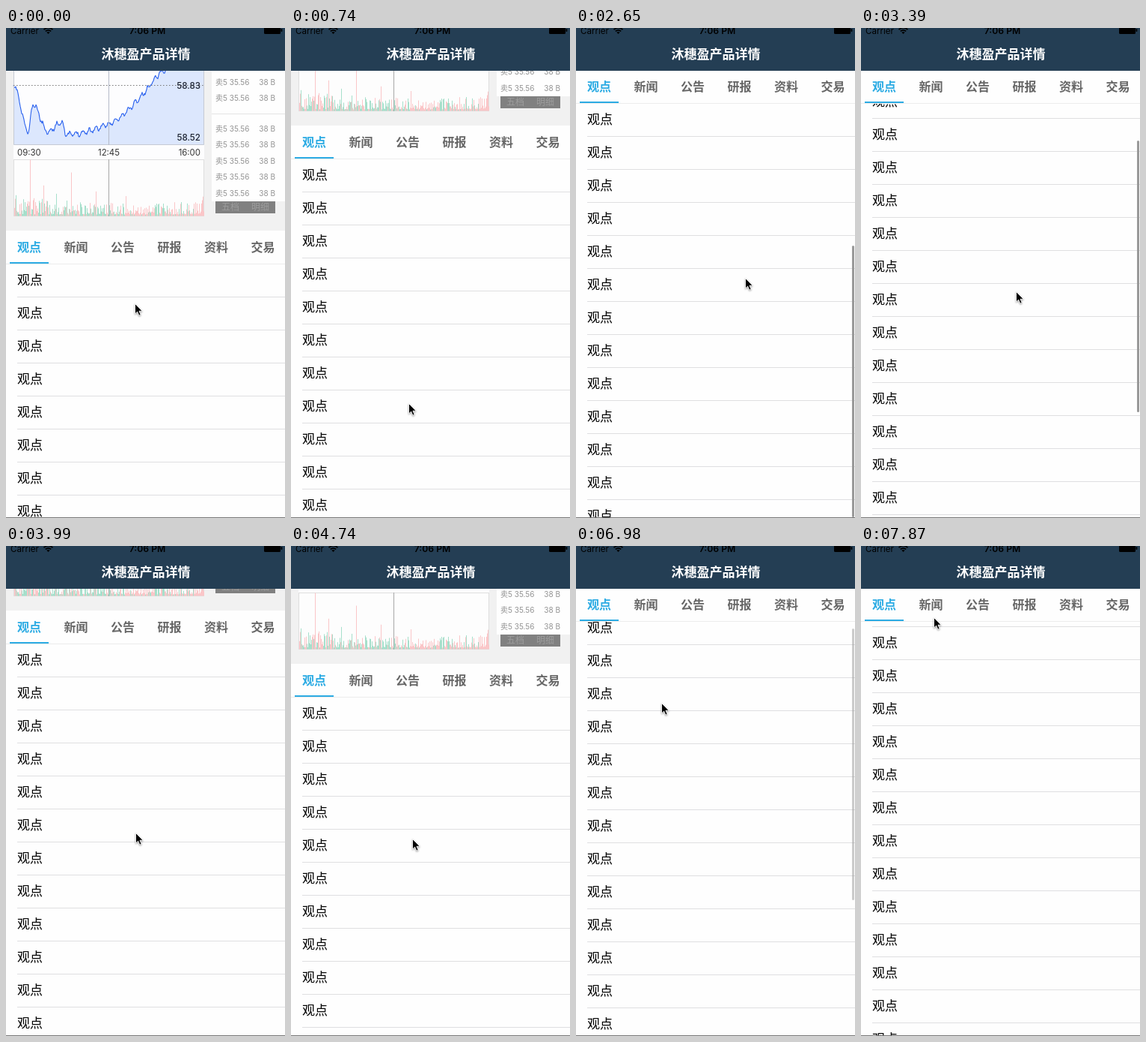
Write an HTML page that moves like this. It is 373 by 653 pixels and loops after 8 s.

```html
<!DOCTYPE html>
<html lang="zh-CN">
<head>
<meta charset="utf-8">
<title>产品详情</title>
<style>
html, body { margin: 0; width: 100%; height: 100%; overflow: hidden; background: #fefefe; }
body { position: relative; font-family: Inter, "Noto Sans CJK SC", "Noto Sans CJK", sans-serif; }
body > *, .abs { position: absolute; }
svg { display: block; overflow: hidden; }

#market { left: 0; top: 0; width: 373px; height: 270px; background: #f1f1f1; }
#market text { font-size: 11.6px; font-weight: 500; fill: #1c2230; }
#market .times text { font-size: 11.4px; font-weight: 400; fill: #333; }
#market .quotes text { font-size: 10px; font-weight: 400; fill: #949494; }
#market .modes text { font-size: 12px; font-weight: 400; fill: #9c9c9c; }

#list { left: 0; top: 44px; width: 373px; }
#list div { position: relative; height: 44px; padding-left: 15px; font-size: 17px; line-height: 45px; color: #000; }
#list div::after { content: ""; position: absolute; left: 15px; right: 0; top: 44px; height: 1px; background: #dfdfe1; }

#tabs { left: 0; top: 0; width: 373px; height: 44px; background: #fefefe; border-bottom: 1px solid #ececec; }
#tabs span { position: absolute; width: 62px; text-align: center; font-size: 16px; font-weight: 600; line-height: 45px; color: #666; }
#tabs span:first-child { color: #2cabe3; }
#tabs i { position: absolute; left: 5px; top: 42px; width: 52px; height: 2px; background: #2cabe3; }

#nav { left: 0; top: 0; width: 373px; height: 57px; background: #243e54; }
#nav h1 { margin: 0; position: absolute; top: 20px; width: 374px; text-align: center; font-size: 17px; font-weight: 600; line-height: 30px; color: #fff; }
#nav svg { position: absolute; left: 0; top: 0; }

#thumb { left: 369px; width: 2.5px; border-radius: 2px; background: #999; }
#edge { left: 0; top: 652px; width: 373px; height: 1px; background: #777; }
#cursor { left: 0; top: 0; overflow: visible; filter: drop-shadow(0 1px 1px rgba(0, 0, 0, .4)); }
</style>
</head>
<body>
<svg id="market" viewBox="0 0 373 270">
  <rect x="10" y="40" width="255" height="136" fill="#fdfdfe"/>
  <path id="area" fill="#dce7fd"/>
  <path id="price" fill="none" stroke="#2860ee" stroke-width="1.1" stroke-linejoin="round"/>
  <path d="M10.5 40V155.5H264.5V40" fill="none" stroke="#c5cad4"/>
  <path d="M137.5 40V156" stroke="#b4bac8"/>
  <path d="M10 76.5H265" stroke="#777" stroke-dasharray="1.5 2.5"/>
  <g text-anchor="end"><text x="260" y="81">58.83</text><text x="260" y="150">58.52</text></g>
  <g class="times">
    <text x="15" y="170">09:30</text>
    <text x="137.5" y="170" text-anchor="middle">12:45</text>
    <text x="260" y="170" text-anchor="end">16:00</text>
  </g>
  <rect x="10.5" y="175.5" width="254" height="75" fill="#fdfdfd" stroke="#dedede"/>
  <path id="falls" stroke="#a6dfcb"/>
  <path id="rises" stroke="#fac6c8"/>
  <path d="M137.5 175V251" stroke="#a8a8a8"/>
  <rect x="280" y="227" width="80" height="20" fill="#808080"/>
  <g class="modes"><text x="288" y="243">五档</text><text x="328" y="243">明细</text></g>
  <rect x="275" y="40" width="98" height="191" fill="#fefefe"/>
  <path d="M275 114.5H373" stroke="#e4e4e4"/>
  <g class="quotes" id="quotes"></g>
</svg>

<div id="sheet">
  <div id="list" class="abs"></div>
  <div id="tabs" class="abs"></div>
</div>
<div id="thumb"></div>

<div id="nav">
  <svg width="373" height="20">
    <text x="6" y="7.5" font-size="11.6">Carrier</text>
    <path d="M50.5 2.2Q56.5-3 62.5 2.2M52.8 4.4Q56.5 1.2 60.2 4.4" fill="none" stroke="#000" stroke-width="1.7"/>
    <path d="M54.3 5.8Q56.5 4 58.7 5.8L56.5 8Z"/>
    <text x="189" y="7.5" font-size="12.2" font-weight="600" text-anchor="middle">7:06 PM</text>
    <rect x="345" y="-2" width="22" height="10" rx="1.5"/>
    <rect x="367.5" y="1" width="1.8" height="4" rx=".8"/>
  </svg>
  <h1>沐穗盈产品详情</h1>
</div>
<div id="edge"></div>
<svg id="cursor" width="14" height="20">
  <path transform="translate(.5 .5) scale(.87)" d="M0 0V15.5L3.6 12.2L6.1 18L8.8 16.9L6.3 11.2H11.2Z" fill="#000" stroke="#fff"/>
</svg>

<script>
const $ = id => document.getElementById(id);

let seed = 11;
const random = () => (seed = seed * 16807 % 2147483647) / 2147483647;
const clamp = (value, low, high) => Math.min(high, Math.max(low, value));

const LOOP = 8000, STEP = 148.6, LEAD = 25;
const PINNED = 56;

// Tracks: [step, ...values]; the picture changes once per step.
const tabTop = [[0, 270], [5, 130], [8, PINNED], [24, PINNED], [27, 86], [32, 157], [42, 100], [46, PINNED]];
const listScroll = [[8, 0], [18, 264], [24, 0], [46, 0], [50, 81]];
const pointer = [[0, 172, 367], [5, 157, 500], [18, 226, 333], [27, 173, 382], [32, 162, 390], [42, 135, 322], [53, 97, 95]];

// Monotone cubic interpolation, held flat beyond both ends.
function sample(track, at, axis = 1) {
  const x = clamp(at, track[0][0], track[track.length - 1][0]);
  let i = 0;
  while (i < track.length - 2 && x >= track[i + 1][0]) i++;
  const slope = n => {
    const a = track[n], b = track[n + 1];
    return a && b ? (b[axis] - a[axis]) / (b[0] - a[0]) : 0;
  };
  const tangent = n => {
    const before = slope(n - 1), after = slope(n);
    return before * after > 0 ? 2 * before * after / (before + after) : 0;
  };
  const [from, to] = [track[i], track[i + 1]];
  const span = to[0] - from[0], u = (x - from[0]) / span, v = 1 - u;
  return from[axis] * v * v * (1 + 2 * u) + to[axis] * u * u * (3 - 2 * u)
    + span * u * v * (v * tangent(i) - u * tangent(i + 1));
}

function drawPrice() {
  const trend = [[10, 76], [30, 138], [36, 102], [56, 138], [75, 125], [80, 142], [140, 127], [180, 92], [210, 57], [265, 38]];
  const points = [];
  for (let x = 10; x <= 265; x++) {
    const wobble = 3 * Math.sin(x * .72) + 4 * (random() - .5);
    points.push(`${x} ${(sample(trend, x) + wobble).toFixed(1)}`);
  }
  const line = "M" + points.join("L");
  $("price").setAttribute("d", line);
  $("area").setAttribute("d", line + "V156H10Z");
}

function drawVolume() {
  const peaks = { 32: 75, 87: 58 };
  const bars = { falls: "", rises: "" };
  for (let x = 11; x < 265; x++) {
    const reach = 14 + 18 * Math.exp((10 - x) / 60) + 24 * Math.exp((x - 265) / 6);
    const spike = random() < .04 ? 16 : 0;
    const height = peaks[x] || 2 + spike + reach * random() ** 1.8;
    const rising = peaks[x] || random() < .4 + .25 * (x > 150) + .3 * (x > 252);
    bars[rising ? "rises" : "falls"] += `M${x + .5} 250.5v${-height.toFixed(1)}`;
  }
  for (const id in bars) $(id).setAttribute("d", bars[id]);
}

function drawQuotes() {
  for (let i = 0; i < 7; i++) {
    const y = 75.7 + i * 21.4 + (i > 1 ? 19.5 : 0);
    $("quotes").innerHTML += `<text x="280" y="${y}">卖5 35.56</text><text x="360" y="${y}" text-anchor="end">38 B</text>`;
  }
}

function buildSheet() {
  $("list").innerHTML = "<div>观点</div>".repeat(22);
  $("tabs").innerHTML = ["观点", "新闻", "公告", "研报", "资料", "交易"].map((name, i) =>
    `<span style="left:${i * 62.5}px">${name}</span>`).join("") + "<i></i>";
}

// Fades in at the first step and out at the last.
const pulse = (step, first, last) => clamp(Math.min(step - first, last - step) / 2, 0, 1);

function draw(time) {
  const step = Math.floor((time % LOOP + LEAD) / STEP);
  const top = Math.round(sample(tabTop, step));
  const scroll = Math.round(sample(listScroll, step));
  const move = (id, x, y) => $(id).style.transform = `translate(${x}px, ${y}px)`;
  move("market", 0, top - 270);
  move("sheet", 0, top);
  move("list", 0, -scroll);
  move("cursor", Math.round(sample(pointer, step, 1)), Math.round(sample(pointer, step, 2)));

  const thumb = $("thumb").style, shift = scroll * .716;
  thumb.top = 101 + shift + "px";
  thumb.bottom = Math.max(1, 190 - shift) + "px";
  thumb.opacity = Math.max(pulse(step, 8, 25), pulse(step, 46, 52));
}

drawPrice();
drawVolume();
drawQuotes();
buildSheet();
const origin = performance.now();
function tick() {
  draw(performance.now() - origin);
  requestAnimationFrame(tick);
}
tick();
</script>
</body>
</html>
```
